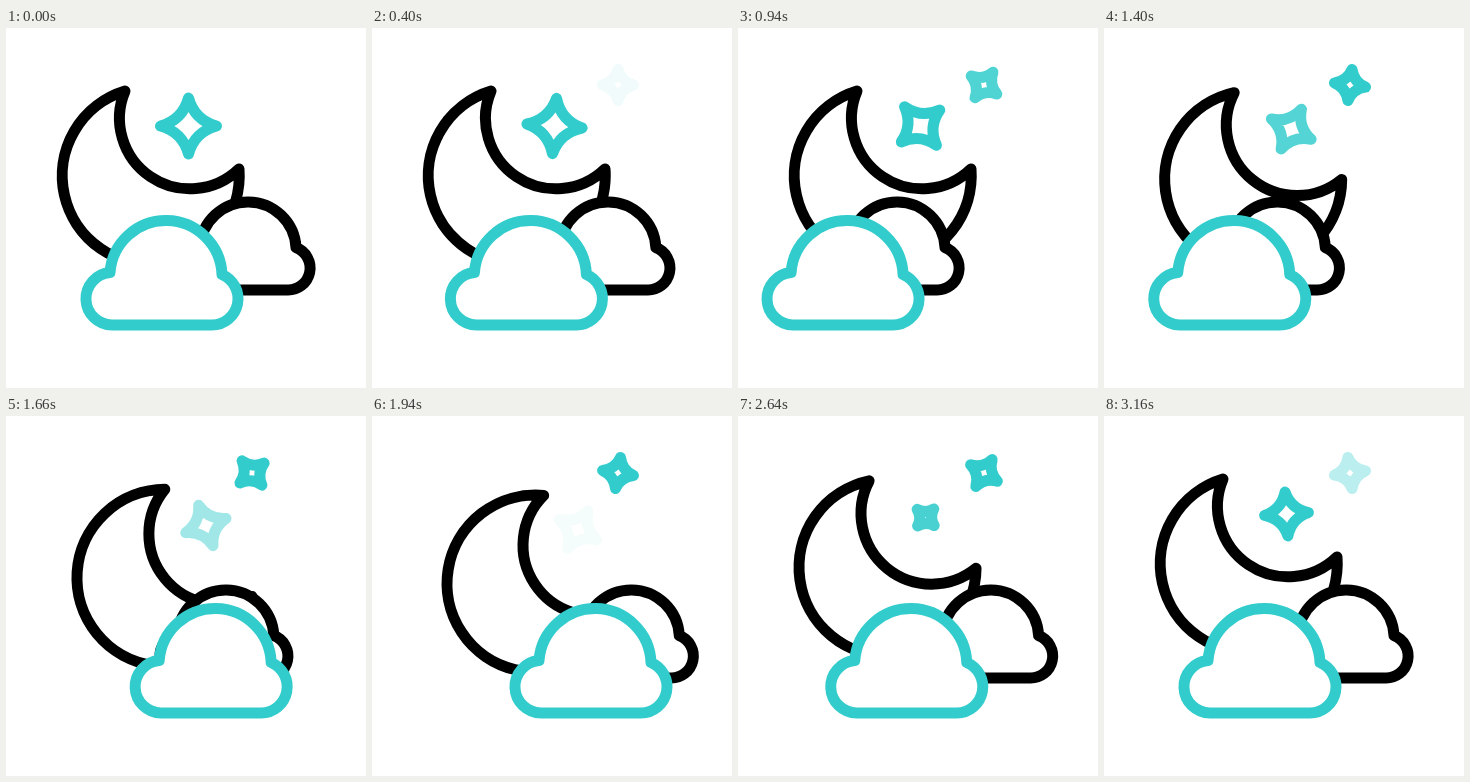
An HTML page that plays this animation: 360x360 px, repeating every 3180 ms.

```html
<!DOCTYPE html>
<html lang="en">
<head>
<meta charset="utf-8">
<title>Cloudy night</title>
<style>
  html, body { margin: 0; height: 100%; overflow: hidden; background: #fff; }
  svg { display: block; width: 100vw; height: 100vh; }
  path { fill: #fff; stroke: #000; stroke-width: 11; stroke-linecap: round; stroke-linejoin: round; }
  .teal { stroke: #33cccc; }
</style>
</head>
<body>
<svg viewBox="0 0 360 360">
  <path id="moon" d="M119 63A88.5 88.5 0 1 0 233 141A70.5 70.5 0 0 1 119 63Z"/>
  <path id="bigStar" class="teal"/>
  <path id="smallStar" class="teal"/>
  <path id="backCloud" d="M194 218.5A22 22 0 0 0 196 262H281A22 22 0 0 0 290 219.5A48.1 48.1 0 0 0 194 218.5Z"/>
  <path id="frontCloud" class="teal" d="M104 244.5A26.3 26.3 0 0 0 106 297H206A26.3 26.3 0 0 0 216 246.5A56.1 56.1 0 0 0 104 244.5Z"/>
</svg>
<script>
const LOOP = 3180;
const FADE = 680;
const [moon, bigStar, smallStar, backCloud, frontCloud] = document.querySelectorAll('path');

const linear = u => u;
const smooth = u => u * u * (3 - 2 * u);
const cubic = u => u < 0.5 ? 4 * u ** 3 : 1 - 4 * (1 - u) ** 3;

// Progress from 0 to 1 between two times.
const ramp = (t, start, end, ease = cubic) =>
  ease(Math.min(1, Math.max(0, (t - start) / (end - start))));
const fade = (t, start) => ramp(t, start, start + FADE, linear);

const place = (path, transform) => path.setAttribute('transform', transform);

// The outline grows and shrinks while its stroke keeps its weight.
function drawStar(star, x, y, scale, angle, opacity) {
  const r = 28 * scale, c = 6 * scale;
  star.setAttribute('d', `M0 ${-r}Q${c} ${-c} ${r} 0Q${c} ${c} 0 ${r}Q${-c} ${c} ${-r} 0Q${-c} ${-c} 0 ${-r}Z`);
  star.setAttribute('opacity', opacity);
  place(star, `translate(${x} ${y}) rotate(${angle})`);
}

function draw(t) {
  // Each cloud drifts left, then right, then home.
  const front = -51.5 * ramp(t, 240, 1055) + 114.5 * ramp(t, 1117, 1907) - 63 * ramp(t, 2137, 2937);
  const back = -83 * ramp(t, 200, 960) + 108 * ramp(t, 985, 2280) - 25 * ramp(t, 2280, 2965);
  const tilt = 22.6 * (ramp(t, 973, 2134) - ramp(t, 2134, 2950));
  place(frontCloud, `translate(${front} 0)`);
  place(backCloud, `translate(${back} 0)`);
  place(moon, `rotate(${tilt} 103.5 205.5)`);

  // The big star fades out while shrinking a little, then grows back from nothing.
  const scale = t < 2000 ? 1 - 0.24 * ramp(t, 200, 1800, smooth) : ramp(t, 1727, 3774, smooth);
  drawStar(bigStar, 182.5 + 1.05 * tilt, 98 + 0.7 * tilt, scale,
    360 * ramp(t, 200, 3350, smooth), 1 - fade(t, 1290) + fade(t, 2035));
  drawStar(smallStar, 246, 57, 0.56,
    360 * ramp(t, 345, 3430, smooth), fade(t, 360) - fade(t, 2705));
}

function tick() {
  draw(performance.now() % LOOP);
  requestAnimationFrame(tick);
}
tick();
</script>
</body>
</html>
```
